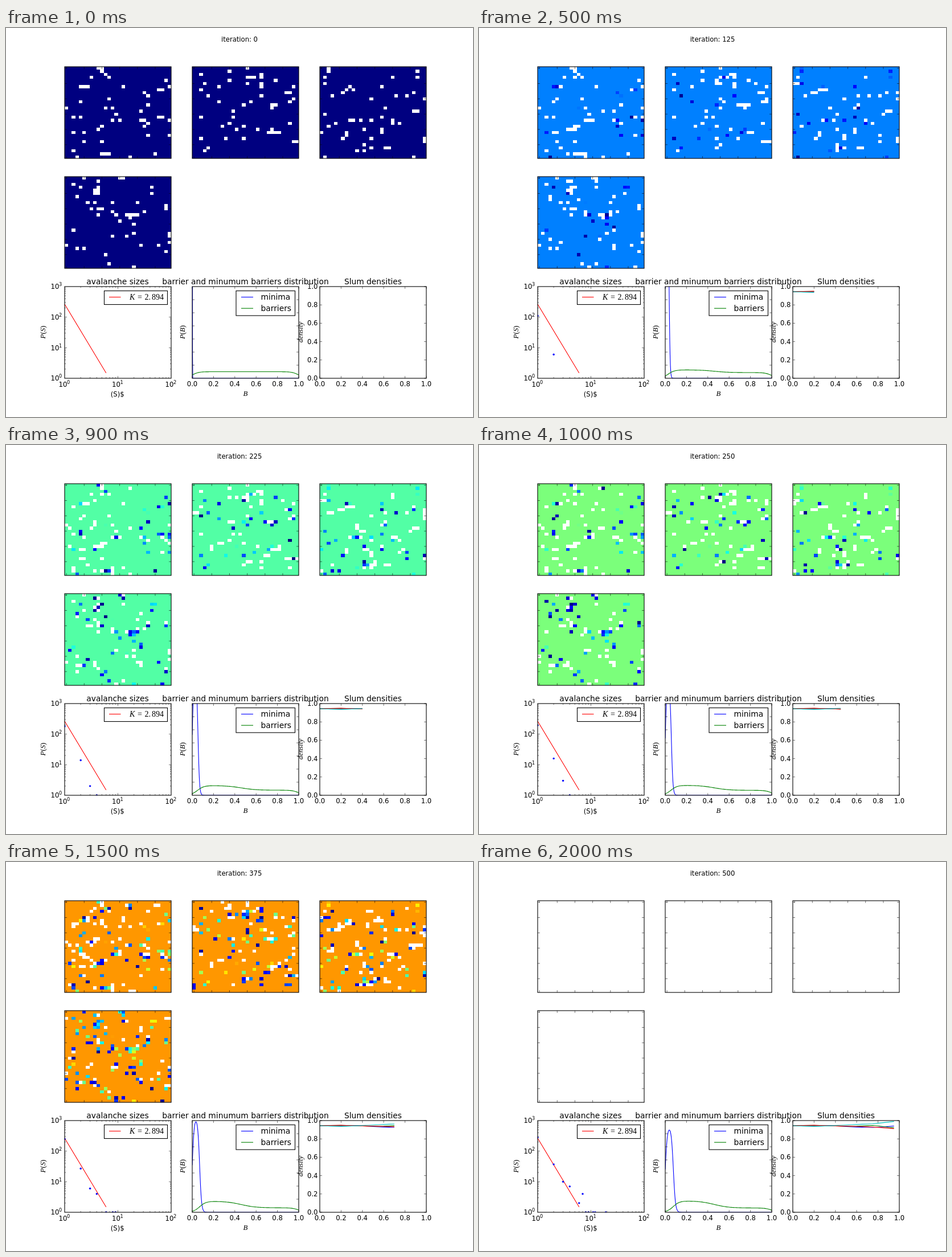
Animation of 820x683 px, one loop 2100 ms. Source, as an HTML page:

```html
<!DOCTYPE html>
<html lang="en">
<head>
<meta charset="utf-8">
<title>Slum simulation</title>
<style>
  html, body { margin: 0; width: 100%; height: 100%; overflow: hidden; background: #fff; }
  svg { display: block; width: 820px; height: 683px; }
  text { font: 11.6px "DejaVu Sans", sans-serif; }
  .big { font-size: 13.8px; }
  .sup { font-size: 8.2px; }
  .math { font: 14px "Liberation Serif", serif; }
  .math.small { font-size: 12.8px; }
  .it { font-style: italic; }
  .frame { fill: none; stroke: #000; stroke-width: 1.1; }
  .tick { fill: none; stroke: #000; stroke-width: .55; }
  .curve { fill: none; stroke-width: 1.1; }
  .cells { shape-rendering: crispEdges; }
</style>
</head>
<body>
<svg id="stage" viewBox="0 0 820 683"></svg>
<script>
const STEP_MS = 100, STEPS = 21, PER_STEP = 25, LIFE = 500;
const SIDE = 30, CELLS = SIDE * SIDE;
const W = 187, H = 161, PITCH_X = 224, PITCH_Y = 193;
const [LEFT, MID, RIGHT] = [0, 1, 2].map(i => 103 + i * PITCH_X);
const TOP = 68, PLOT_Y = TOP + 2 * PITCH_Y, BASE = PLOT_Y + H;

// density: evenly spaced key points over the whole run
const panels = [
  { color: '#00f', density: [.945, .943, .945, .93, .925, .94] },
  { color: '#008000', density: [.945, .945, .941, .938, .948, .92] },
  { color: '#f00', density: [.945, .95, .942, .938, .93, .912] },
  { color: '#00bfbf', density: [.945, .936, .945, .956, .966, .99] }
];

const range = (n, f) => Array.from({ length: n }, (_, i) => f(i));
const clamp = v => Math.max(0, Math.min(1, v));
const ramp = (v, from, to) => clamp((v - from) / (to - from));
const sigmoid = v => 1 / (1 + Math.exp(-v));

function jet(v) {
  const r = ramp(v, .35, .66) - ramp(v, .89, 1) / 2;
  const g = ramp(v, .125, .375) - ramp(v, .64, .91);
  const b = .5 + ramp(v, 0, .11) / 2 - ramp(v, .34, .65);
  return `rgb(${[r, g, b].map(c => Math.round(c * 255))})`;
}

function seeded(seed) {
  return () => {
    seed = (seed * 1664525 + 1013904223) >>> 0;
    return seed / 4294967296;
  };
}

function densityAt({ density }, k) {
  const at = Math.min(k / (STEPS - 2), 1) * (density.length - 1);
  const i = Math.min(Math.floor(at), density.length - 2);
  return density[i] + (density[i + 1] - density[i]) * (at - i);
}

// People move into gaps and leave new ones, often beside older gaps.
// Each cell holds its last arrival, or null for a gap.
function simulate(panel, index) {
  const random = seeded(71 + index * 997);
  const pick = list => list[Math.floor(random() * list.length)];
  const arrived = Array(CELLS).fill(0);
  const gaps = () => [...arrived.keys()].filter(i => arrived[i] === null);
  const gapTarget = k => Math.round(CELLS * (1 - densityAt(panel, k)));

  function fillTo(count, k) {
    for (let open = gaps(); open.length > count; open = gaps()) {
      arrived[pick(open)] = (k - random()) * PER_STEP;
    }
  }
  function openTo(count, nearby) {
    for (let open = gaps(); open.length < count; open = gaps()) {
      const cell = open.length && random() < nearby
        ? pick(open) + pick([-1, 1, -SIDE, SIDE])
        : Math.floor(random() * CELLS);
      if (cell >= 0 && cell < CELLS) arrived[cell] = null;
    }
  }

  openTo(gapTarget(0), .12);
  return range(STEPS - 1, k => {
    if (k) {
      const moves = 2 + Math.round(k / 4);
      fillTo(Math.min(gaps().length, gapTarget(k)) - moves, k);
      openTo(gapTarget(k), .45);
    }
    return [...arrived];
  });
}

function cellsMarkup(panel, k) {
  const now = k * PER_STEP;
  if (now >= LIFE) return '';
  const w = W / SIDE, h = H / SIDE;
  let out = `<rect x="${panel.x}" y="${panel.y}" width="${W}" height="${H}" fill="${jet(now / LIFE)}"/>`;
  panel.history[k].forEach((since, i) => {
    if (since === 0) return;
    const fill = since === null ? '#fff' : jet((now - since) / LIFE);
    out += `<rect x="${panel.x + i % SIDE * w}" y="${panel.y + Math.floor(i / SIDE) * h}" ` +
      `width="${w}" height="${h}" fill="${fill}"/>`;
  });
  return out;
}

function ticks(x, y, xs, ys, size = 4) {
  const d = xs.map(v => `M${x + v} ${y}v${size}M${x + v} ${y + H}v${-size}`)
    .concat(ys.map(v => `M${x} ${y + v}h${size}M${x + W} ${y + v}h${-size}`));
  return `<path class="tick" d="${d.join('')}"/>`;
}
const box = (x, y, w, h, fill = 'none') =>
  `<rect class="frame" x="${x}" y="${y}" width="${w}" height="${h}" style="fill:${fill}"/>`;
const label = (x, y, text, cls = '', anchor = 'middle') =>
  `<text x="${x}" y="${y}" class="${cls}" text-anchor="${anchor}">${text}</text>`;
const upright = (x, y, text) =>
  `<text class="math small it" text-anchor="middle" transform="translate(${x} ${y}) rotate(-90)">${text}</text>`;
const power = (x, y, n) => label(x, y, '10', '', 'start') + label(x + 14.6, y - 5, n, 'sup', 'start');
const stroke = (d, color) => `<path class="curve" d="${d}" stroke="${color}"/>`;
const path = points => 'M' + points.map(p => p.map(v => v.toFixed(2)).join(' ')).join('L');
const logX = v => LEFT + Math.log10(v) * W / 2;
const logY = v => BASE - Math.log10(v) * H / 3;

function gridFrame({ x, y }) {
  const marks = size => range(6, i => (i * 5 + .5) * size / SIDE);
  return ticks(x, y, marks(W), marks(H)) + box(x, y, W, H);
}

function plotFrames() {
  const fifths = range(6, i => i / 5);
  const minor = decades => range(decades, n => range(8, i => n + Math.log10(i + 2))).flat();
  const paren = s => `P<tspan font-style="normal">(</tspan>${s}<tspan font-style="normal">)</tspan>`;
  let out = ticks(LEFT, PLOT_Y, [W / 2], [H / 3, H * 2 / 3]) +
    ticks(LEFT, PLOT_Y, minor(2).map(v => v * W / 2), minor(3).map(v => H * (1 - v / 3)), 2) +
    ticks(MID, PLOT_Y, fifths.map(v => v * W), range(6, i => (i + 1) * H / 7)) +
    ticks(RIGHT, PLOT_Y, fifths.map(v => v * W), fifths.map(v => v * H));
  for (const x of [LEFT, MID, RIGHT]) out += box(x, PLOT_Y, W, H);
  range(4, n => { out += power(78.5, BASE + 4.2 - n * H / 3, n); });
  range(3, n => { out += power(92.5 + n * W / 2, 630, n); });
  fifths.forEach(v => {
    const text = v.toFixed(1);
    out += label(MID + v * W, 629, text) + label(RIGHT + v * W, 629, text) +
      label(547.5, BASE + 4 - v * H, text, '', 'end');
  });
  return out + label(196, 450, 'avalanche sizes', 'big') +
    label(420.5, 450, 'barrier and minumum barriers distribution', 'big') +
    label(644.5, 450, 'Slum densities', 'big') +
    label(195.7, 647, '(S)$') + label(420.5, 646, 'B', 'math small it') +
    upright(69, 534, paren('S')) + upright(314, 534, paren('B')) + upright(521, 534, 'density');
}

function legends() {
  return box(172.5, 461.5, 111, 24, '#fff') + stroke('M181 472.5H201.5', '#f00') +
    label(217, 477, 'K', 'math it', 'start') + label(231, 477, '=', 'math', 'start') +
    label(243.5, 477, '2.', 'math', 'start') + label(256, 477, '894', 'math', 'start') +
    box(404, 461.5, 103.5, 43.5, '#fff') +
    stroke('M413 472.5H434', '#00f') + stroke('M413 492.2H434', '#008000') +
    label(447.5, 477, 'minima', 'big', 'start') + label(447.5, 497, 'barriers', 'big', 'start');
}

// Small avalanches pile up steadily, large ones turn up late and once.
function avalanches(k) {
  const since = (first, rate) => k < first ? 0 : 1 + Math.floor(rate * (k - first));
  const counts = [[1, 25 * k * (1 - .022 * k)], [2, since(2.5, 2.1)], [3, since(6, .65)],
    [4, since(9, .55)], [6, since(15, .2)], [7, since(16, .75)]];
  for (const size of [8, 9, 11, 12, 19]) counts.push([size, since(12 + size / 3, 0)]);
  return counts.filter(([, count]) => count >= 1).map(([size, count]) =>
    `<circle cx="${logX(size)}" cy="${logY(count)}" r="1.7" fill="#00f"/>`).join('');
}

// Minima spread evenly up to a growing limit, with blurred ends and unit area.
function minima(k) {
  const limit = Math.max(.3, 16 * (1 - Math.exp(-k / 9)));
  const blur = limit * .13;
  const level = W * H / 14 / limit;
  return path(range(W * 2 + 1, i => {
    const x = i / 2;
    return [MID + x, BASE - level * (sigmoid(x / blur) - sigmoid((x - limit) / blur))];
  }));
}

// Barriers start uniform and shift towards the lower half.
function barriers(k) {
  const progress = Math.sin(Math.PI / 2 * k / (STEPS - 1));
  return path(range(101, i => {
    const x = i / 100;
    const level = 11.5 + progress * (12.5 * sigmoid((.46 - x) / .07) - 4);
    const ends = sigmoid((x - .075 * progress) / .03) * sigmoid((1 - x) / .03);
    return [MID + x * W, BASE - level * ends];
  }));
}

function curves(k) {
  let out = stroke(path([1, 6].map(s => [logX(s), logY(265 * s ** -2.894)])), '#f00') +
    avalanches(k) + stroke(minima(k), '#00f') + stroke(barriers(k), '#008000');
  if (k > 1) {
    for (const p of panels) {
      out += stroke(path(range(k, i => [RIGHT + i * W / 20, BASE - H * densityAt(p, i)])), p.color);
    }
  }
  return out;
}

panels.forEach((p, i) => {
  p.x = LEFT + i % 3 * PITCH_X;
  p.y = TOP + Math.floor(i / 3) * PITCH_Y;
  p.history = simulate(p, i);
});
document.getElementById('stage').innerHTML =
  `<defs><clipPath id="plots">${[LEFT, MID, RIGHT].map(x =>
    `<rect x="${x}" y="${PLOT_Y}" width="${W}" height="${H}"/>`).join('')}</clipPath></defs>` +
  '<text id="title" x="410" y="24" text-anchor="middle"></text><g id="cells" class="cells"></g>' +
  panels.map(gridFrame).join('') +
  '<g id="curves" clip-path="url(#plots)"></g>' + plotFrames() + legends();

const [title, cells, curveLayer] = ['title', 'cells', 'curves'].map(id => document.getElementById(id));
let shown = -1;

function draw(time) {
  const k = Math.floor(time / STEP_MS) % STEPS;
  if (k === shown) return;
  shown = k;
  title.textContent = `iteration: ${k * PER_STEP}`;
  cells.innerHTML = panels.map(p => cellsMarkup(p, k)).join('');
  curveLayer.innerHTML = curves(k);
}

const start = performance.now();
function tick() {
  draw(performance.now() - start);
  requestAnimationFrame(tick);
}
tick();
</script>
</body>
</html>
```
